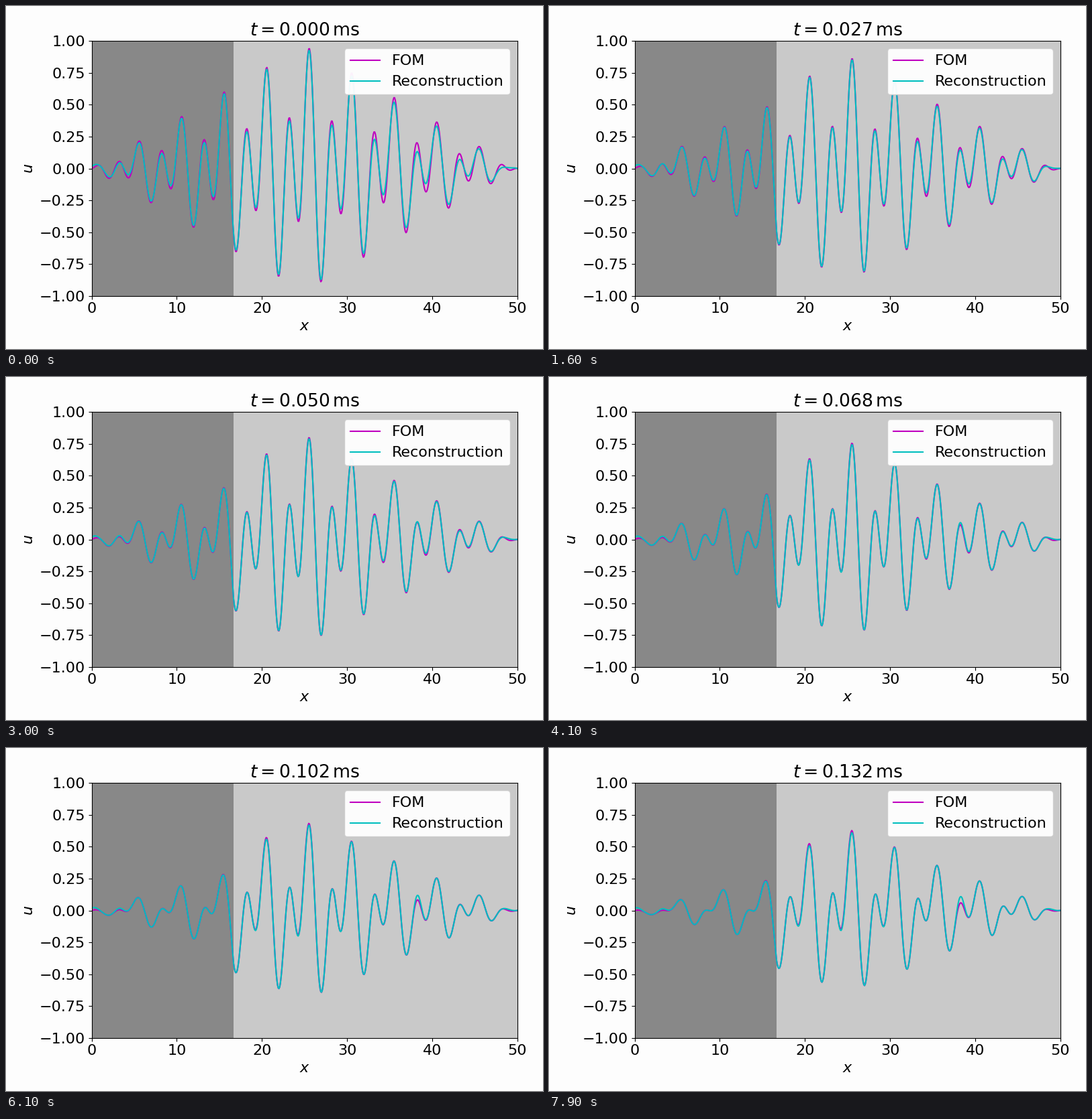
Animation, 800 px wide and 512 px high, one loop 8000 ms. Source, as a matplotlib script:

```python
import numpy as np
import matplotlib.pyplot as plt
from matplotlib.animation import FuncAnimation

W, H, DPI = 800, 512, 100
FRAMES, DT, SUB = 80, 1 / 600, 4
T_END = DT * (FRAMES - 1)
LENGTH, GROWTH = 50, 0.78

plt.rcParams.update({"font.size": 16, "font.family": "DejaVu Sans"})

x = np.linspace(0, LENGTH, 601)
dx = x[1] - x[0]
theta = 2 * np.pi * x / 5
wave, ripple = np.cos(theta), np.sin(2 * theta)


def layered(s, left, centre, right):
    """Material value that changes at each third of the domain."""
    return np.where(s < LENGTH / 3, left,
                    np.where(s < 2 * LENGTH / 3, centre, right))


def bump(centre, width):
    return np.exp(-((x - centre) / width) ** 2)


mid = (x[:-1] + x[1:]) / 2
cond = layered(mid, 0.65, 1, 1)
cap = cond / layered(mid, 1.85, 0.855, 0.94)
node_cap = (cap[:-1] + cap[1:]) / 2


def advance(u):
    """One frame of heat flow with linear growth and fixed ends."""
    u = u.copy()
    for _ in range(SUB):
        flux = cond * np.diff(u) / dx
        u[1:-1] += DT / SUB * (np.diff(flux) / dx / node_cap + GROWTH * u[1:-1])
    return u


def solve():
    tent = 1 - np.abs(2 * x / LENGTH - 1)
    states = [tent * (0.38 * wave + 0.684 * ripple)]
    while len(states) < FRAMES:
        states.append(advance(states[-1]))
    return states


# Reconstruction error: damped ripples that fade, a drift that grows, loose ends
taper = np.clip(np.minimum(x, LENGTH - x) / 2, 0, 1)
fading = -taper * (0.02 + 0.038 * bump(37, 7)) * (ripple - 0.4 * wave)
drift = 0.05 * bump(38.3, 0.55) - 0.025 * bump(23, 6) * np.clip(wave, 0, 1)
ends = 0.02 * bump(0.2, 0.6) + 0.012 * bump(3.3, 0.6) + 0.01 * bump(49, 0.6)

fom = solve()


def rebuild(i):
    t = i * DT
    return fom[i] + fading * np.exp(-t / 0.032) + drift * t / T_END + ends


def caption(i):
    return rf"$t={i * DT:.3f}\,$ms"


fig, ax = plt.subplots(figsize=(W / DPI, H / DPI), dpi=DPI, facecolor="#fdfdfd")
ax.axvspan(0, LENGTH / 3, color="#888888", lw=0)
ax.axvspan(LENGTH / 3, LENGTH, color="#c9c9c9", lw=0)
line_fom, = ax.plot(x, fom[0], color="#bf00bf", label="FOM")
line_rec, = ax.plot(x, rebuild(0), color="#00bfbf", label="Reconstruction")
ax.set(xlim=(0, LENGTH), ylim=(-1, 1), xlabel="$x$", ylabel="$u$")
ax.legend(loc="upper right", framealpha=0.95)
title = ax.set_title(caption(0))
fig.tight_layout()


def update(i):
    line_fom.set_ydata(fom[i])
    line_rec.set_ydata(rebuild(i))
    title.set_text(caption(i))
    return line_fom, line_rec, title


anim = FuncAnimation(fig, update, frames=FRAMES, interval=100,
                     repeat=True, repeat_delay=0, blit=False)
plt.show()
```
